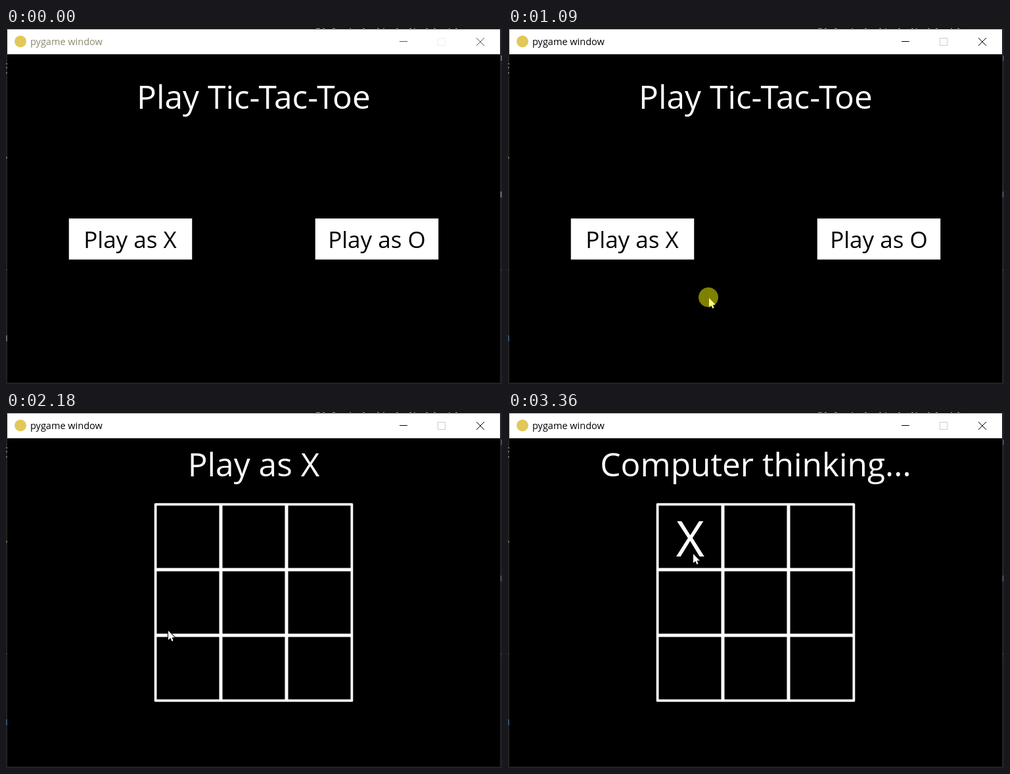
These frames come from a looping animation (755x542 px, 8 s). An HTML page:

```html
<!DOCTYPE html>
<html lang="en">
<head>
<meta charset="utf-8">
<title>Tic-Tac-Toe</title>
<style>
  html, body { margin: 0; width: 100%; height: 100%; overflow: hidden; background: #222; }
  svg { display: block; width: 755px; height: 542px; }
  text { font-family: "Open Sans", "Noto Sans", sans-serif; }
  .big { font-size: 49.6px; fill: #fff; text-anchor: middle; }
  .mid { font-size: 35px; fill: #000; text-anchor: middle; }
  .bar { font-size: 14.5px; fill: #8c8870; }
  .ctl { fill: none; stroke: #555; }
  .max { fill: none; stroke: #eee; }
  .edge { fill: none; stroke: #aaa; }
  .active .bar { fill: #000; }
  .active .ctl { stroke: #000; }
  .active .max { stroke: #ccc; }
  .active .yellow { stroke: #a9a04a; }
  .active .blue { stroke: #3f83b8; }
  .active .violet { stroke: #79628c; }
</style>
</head>
<body>
<svg id="stage" viewBox="0 0 755 542">
  <rect width="755" height="542" fill="#222"/>

  <!-- slivers of the editor behind the window -->
  <path class="edge" d="M472 .5h6m4 0h3m12 0h4m22 0h2m18 0h3m19 0h3m6 0h2m18 0h3m17 0h3m4 0h2m16 0h3m9 0h3m20 0h2m8 0h3"/>
  <path class="edge" d="M0 54.5h2M0 60.5h2M0 68.5h2"/>
  <path class="edge yellow" d="M1 196v3"/>
  <path class="edge blue" d="M1 468v9M754 42v8"/>
  <path class="edge violet" d="M753.5 249v9"/>
  <path stroke="#444" d="M0 368.5h2M752 368.5h3"/>

  <!-- window -->
  <rect x="2" y="40" width="750" height="500"/>
  <rect x="2" y="2" width="750" height="38" fill="#fff"/>
  <circle cx="22" cy="20.5" r="9" fill="#e0c95a"/>
  <text class="bar" x="37" y="26">pygame window</text>
  <path class="ctl" d="M599 20.5h12M716 15l12 12M728 15l-12 12"/>
  <rect class="max" x="657.5" y="15.5" width="11" height="11"/>

  <g id="menu">
    <text class="big" x="377" y="123">Play Tic-Tac-Toe</text>
    <rect x="95.75" y="290" width="187.5" height="62.5" fill="#fff"/>
    <rect x="470.75" y="290" width="187.5" height="62.5" fill="#fff"/>
    <text class="mid" x="189" y="335">Play as X</text>
    <text class="mid" x="564.5" y="335">Play as O</text>
  </g>

  <g id="board">
    <text class="big" id="status" x="377" y="98"></text>
    <g fill="none" stroke="#fff">
      <rect x="227.6" y="140.6" width="298.8" height="298.8" stroke-width="3.75" stroke-linejoin="round"/>
      <path d="M327 140v300M427 140v300M227 240h300M227 340h300" stroke-width="5"/>
    </g>
    <text class="big" id="mark" x="277.5" y="220" style="font-size:75px">X</text>
  </g>

  <g id="pointer">
    <path d="M1 1V15L4.3 12L6.5 17L8.6 16.1L6.5 11.2H10.8Z" fill="#fff" stroke="#000" stroke-width="2" paint-order="stroke"/>
    <circle id="halo" r="15" fill="#ff0" fill-opacity=".5"/>
  </g>
</svg>
<script>
const $ = id => document.getElementById(id);
const LOOP = 8000;

// the pointer is sampled in a few steps per move
const moves = [
  { start: 220, end: 470, steps: 4, to: [281, 362] },
  { start: 780, end: 940, steps: 3, to: [305, 410] },
  { start: 1480, end: 1710, steps: 4, to: [246, 332] },
  { start: 2720, end: 3120, steps: 6, to: [281, 215] }
];
const clicks = [[1090, 1180], [2020, 2100], [3280, 3360]];

const smooth = p => p * p * (3 - 2 * p);
const show = (id, on) => $(id).style.display = on ? "" : "none";

function pointerAt(t) {
  let pos = [380.5, 454];
  for (const { start, end, steps, to } of moves) {
    if (t < start) break;
    const step = Math.floor((t - start + 4) / (end - start) * (steps - 1)) + 1;
    const p = smooth(Math.min(1, step / steps));
    pos = pos.map((v, i) => v + (to[i] - v) * p);
  }
  return pos.map(Math.round);
}

function draw(now) {
  const t = now % LOOP;
  const playing = t >= 2180, marked = t >= 3360;
  $("stage").classList.toggle("active", t >= 1090);
  show("menu", !playing);
  show("board", playing);
  show("mark", marked);
  $("status").textContent = marked ? "Computer thinking..." : "Play as X";
  show("pointer", t >= 220);
  show("halo", clicks.some(([on, off]) => t >= on && t < off));
  $("pointer").setAttribute("transform", `translate(${pointerAt(t)})`);
  requestAnimationFrame(draw);
}
draw(performance.now());
</script>
</body>
</html>
```
